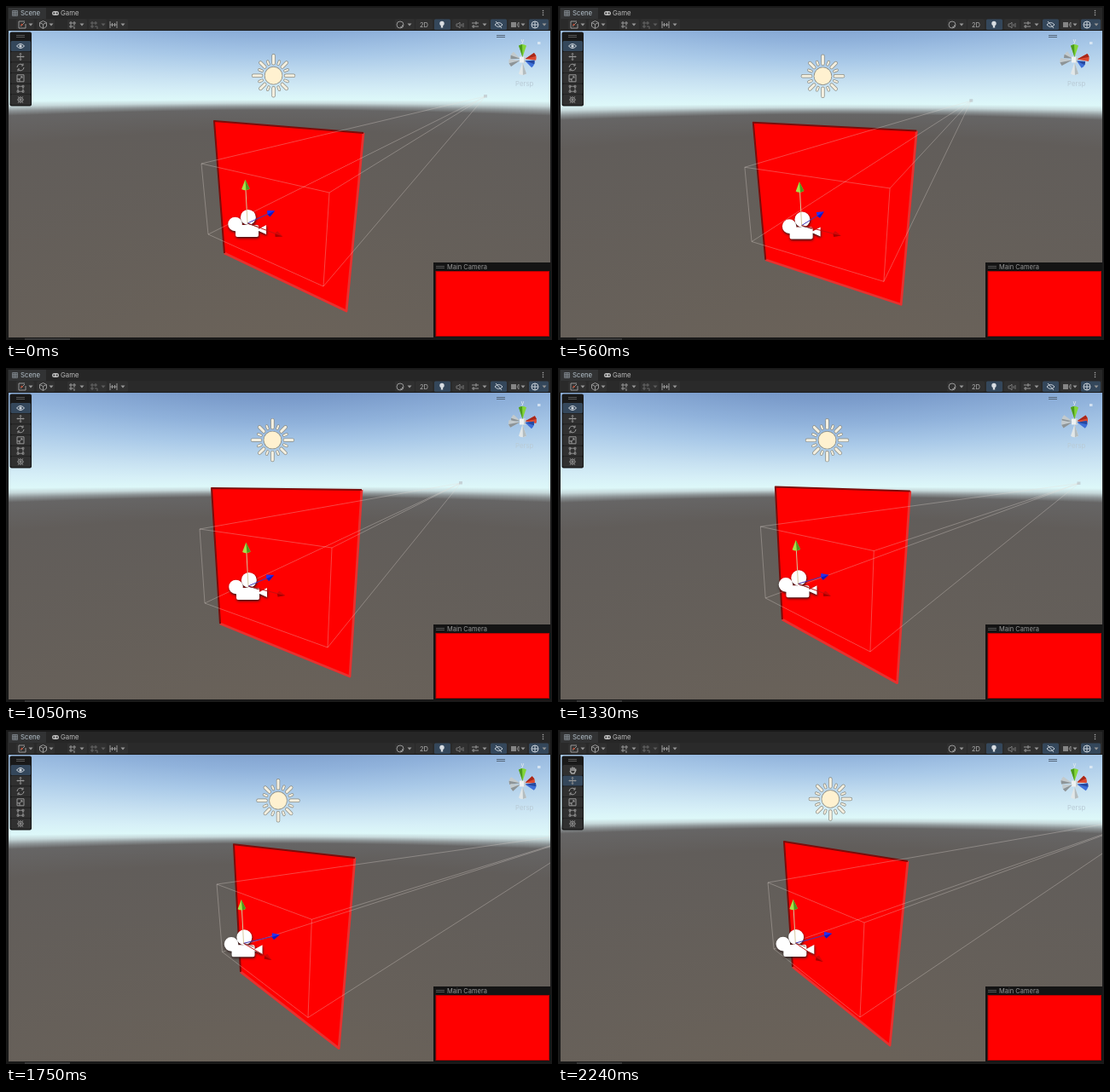
Animation, 640 px wide and 392 px high, one loop 2.66 s. Source, as an HTML page with a canvas:

```html
<!DOCTYPE html>
<html lang="en">
<head>
<meta charset="utf-8">
<title>Scene view orbit</title>
<style>
html, body { margin: 0; width: 100%; height: 100%; overflow: hidden; background: #191919; }
canvas { display: block; }
</style>
</head>
<body>
<canvas id="stage" width="640" height="392"></canvas>
<script>
const ctx = document.getElementById('stage').getContext('2d');
const LOOP = 2660, STEP = 70, STOP = 1960, TOOL_SWITCH = 2240, FOCAL = 312;

// Orbit poses: wall corners, view box corners, vanishing point
const times = [0, 350, 770, 1050, 1610, STOP];
const poses = [
  [244,135, 419,149, 399,358, 256,290,  229,185, 379,219, 372,329, 237,268,  562,106],
  [233,134, 421,149, 400,350, 248,291,  222,187, 386,218, 378,325, 231,271,  511,97],
  [228,140, 419,144, 404,353, 241,304,  218,191, 390,210, 384,323, 225,281,  473,128],
  [241,141, 417,143, 403,362, 251,300,  227,189, 382,211, 377,328, 233,276,  533,135],
  [266,137, 409,147, 392,375, 273,289,  246,183, 360,219, 356,337, 252,264,  680,130],
  [265,131, 410,154, 389,370, 275,278,  246,179, 359,226, 354,337, 253,257,  706,99]
];

function slope(i, n) {
  const last = times.length - 1;
  if (i === last) return 0;
  const a = Math.max(i - 1, 0), b = i + 1;
  return (poses[b][n] - poses[a][n]) / (times[b] - times[a]);
}

function poseAt(t) {
  t = Math.min(t, STOP);
  let i = 0;
  while (i < times.length - 2 && t >= times[i + 1]) i++;
  const span = times[i + 1] - times[i], s = (t - times[i]) / span;
  const v = poses[i].map((p, n) => {
    const q = poses[i + 1][n], blend = s * s * (3 - 2 * s);
    return p + (q - p) * blend + span * s * (1 - s) *
      ((1 - s) * slope(i, n) - s * slope(i + 1, n));
  });
  const pts = [];
  for (let n = 0; n < v.length; n += 2) pts.push([v[n], v[n + 1]]);
  return { wall: pts.slice(0, 4), box: pts.slice(4, 8), vp: pts[8] };
}

function rect(x, y, w, h, color) {
  ctx.fillStyle = color;
  ctx.fillRect(x, y, w, h);
}

function poly(pts, close = true) {
  ctx.beginPath();
  pts.forEach(p => ctx.lineTo(...p));
  if (close) ctx.closePath();
}

function line(pts, color, width = 1, close = false) {
  poly(pts, close);
  ctx.strokeStyle = color;
  ctx.lineWidth = width;
  ctx.stroke();
}

function dot(x, y, r, color) {
  ctx.beginPath();
  ctx.arc(x, y, r, 0, 7);
  ctx.fillStyle = color;
  ctx.fill();
}

function text(s, x, y, color, size = 7.8) {
  ctx.font = size + 'px Inter, sans-serif';
  ctx.fillStyle = color;
  ctx.fillText(s, x, y);
}

function icon(x, y, d, color = '#969696', width = 1) {
  ctx.save();
  ctx.translate(x, y);
  ctx.strokeStyle = color;
  ctx.lineWidth = width;
  ctx.stroke(new Path2D(d));
  ctx.restore();
}

function button(x, y, w, h, on) {
  ctx.beginPath();
  ctx.roundRect(x, y, w, h, 1.5);
  ctx.fillStyle = on ? '#34475b' : '#303030';
  ctx.fill();
}

function grip(x, y, color) {
  rect(x, y, 10, 1, color);
  rect(x, y + 2, 10, 1, color);
}

// Cone from its tip back along the angle
function cone(x, y, angle, len, w, light, dark) {
  ctx.save();
  ctx.translate(x, y);
  ctx.rotate(angle);
  ctx.beginPath();
  ctx.moveTo(0, 0);
  ctx.lineTo(-len, -w);
  ctx.quadraticCurveTo(-len - 3, 0, -len, w);
  ctx.closePath();
  ctx.fillStyle = light;
  ctx.fill();
  ctx.beginPath();
  ctx.moveTo(0, 0);
  ctx.lineTo(-len - 1.5, w * .1);
  ctx.lineTo(-len, w);
  ctx.fillStyle = dark;
  ctx.fill();
  ctx.restore();
}

function sky(horizon) {
  const g = ctx.createLinearGradient(0, -140, 0, 280);
  [[-140, '#6486b8'], [-98, '#7b9ccb'], [-70, '#90b2db'], [-46, '#a9c9e8'],
   [-22, '#c6e0f1'], [-6, '#d6eff7'], [4, '#ddf8f9'], [8, '#c6d8da'],
   [12, '#8d9496'], [16, '#666565'], [40, '#615d5a'], [280, '#6a6259']]
    .forEach(([d, c]) => g.addColorStop((d + 140) / 420, c));
  ctx.fillStyle = g;
  for (let x = 3; x < 638; x += 5) {
    ctx.save();
    ctx.translate(0, horizon);
    ctx.scale(1, Math.hypot(1, (x - 318) / FOCAL));
    ctx.fillRect(x, -200, 5, 600);
    ctx.restore();
  }
}

function sun(x, y) {
  ctx.lineCap = 'round';
  for (const [color, grow] of [['#8b8c84', 1.4], ['#f4efdf', 0]]) {
    for (let i = 0; i < 16; i++) {
      const a = i * Math.PI / 8, end = i % 2 ? 18 : i % 4 ? 21.5 : 23.5;
      const c = Math.cos(a), s = Math.sin(a);
      line([[x + c * 14.5, y + s * 14.5], [x + c * end, y + s * end]], color, (i % 2 ? 2 : 3) + grow);
    }
    dot(x, y, 10 + grow / 2, grow ? color : '#fff1d0');
  }
  ctx.lineCap = 'butt';
}

function wall(q) {
  poly(q);
  ctx.fillStyle = '#f00';
  ctx.fill();
  ctx.lineJoin = 'round';
  line([q[1], q[2], q[3]], '#e8312f', 2.8);
  line([q[3], q[0], q[1]], '#7c0c0a', 2);
}

function cameraIcon(x, y) {
  ctx.save();
  ctx.shadowColor = '#2a1a1a';
  ctx.shadowBlur = 3;
  ctx.shadowOffsetX = .5;
  ctx.shadowOffsetY = 1.5;
  ctx.beginPath();
  ctx.arc(x - 14.5, y + 1, 8.3, 0, 7);
  ctx.arc(x + .8, y - 7, 9, 0, 7);
  ctx.roundRect(x - 14, y + 2, 27, 14, 2);
  ctx.moveTo(x + 11, y + 8);
  ctx.lineTo(x + 22, y + 2);
  ctx.lineTo(x + 22, y + 13);
  ctx.closePath();
  ctx.fillStyle = '#fff';
  ctx.fill();
  ctx.restore();
}

function moveArrows(ox, oy, vx, vy) {
  const up = [ox - 2.5, oy - 51.3];
  const blue = [308 + .04 * (vx - 473), 242.5 + .08 * (vy - 112) - .012 * (vx - 560)];
  const red = [329 - .093 * (vx - 473), 269 - .1 * (vy - 106)];
  const arrow = (p, len, w, light, dark, stem) => {
    const a = Math.atan2(p[1] - oy, p[0] - ox);
    line([[ox, oy], p], stem);
    cone(p[0] + Math.cos(a) * 4, p[1] + Math.sin(a) * 4, a, len, w, light, dark);
  };
  arrow(red, 8, 3.5, '#d20808', '#a80000', '#c41010');
  arrow(blue, 8, 4, '#2630ee', '#1818b8', '#4038b8');
  arrow([up[0], up[1] + 4], 11, 4.8, '#a6e04a', '#4f9420', '#d6c8a0');
  line([[ox, oy], [ox + 12, oy + 4]], '#703030', .8);
}

function axisGizmo(vx, vy) {
  const yaw = Math.atan((vx - 320) / FOCAL), pitch = Math.atan((210 - vy) / FOCAL);
  const axis = (x, z, light, dark, label) => ({ x, y: -z * Math.sin(pitch), z, light, dark, label });
  const c = Math.cos(yaw), s = Math.sin(yaw), cx = 605.5, cy = 63;
  const parts = [
    axis(c, s, '#dd4a30', '#a8281a'), axis(s, -c, '#3d6fd8', '#2448a0'),
    axis(-c, -s, '#c3cacd', '#8d9497'), axis(-s, c, '#c3cacd', '#8d9497'),
    { x: 0, y: -Math.cos(pitch), z: -.2, light: '#83d63a', dark: '#4b9a1d', label: 'y' },
    { x: 0, y: Math.cos(pitch), z: .2, light: '#e2e7e8', dark: '#b4bdc0' },
    { z: 0, cube: true }
  ].sort((a, b) => b.z - a.z);
  for (const p of parts) {
    if (p.cube) {
      rect(cx - 3.5, cy - 3.5, 7, 7, '#eef2f2');
      rect(cx + 1.5, cy - 3.5, 2, 7, '#c9d0d2');
      continue;
    }
    const a = Math.atan2(p.y, p.x), r = Math.hypot(p.x, p.y);
    cone(cx + Math.cos(a) * 3, cy + Math.sin(a) * 3, a + Math.PI, 3 + 11 * r, 4.5, p.light, p.dark);
    if (p.label) text(p.label, cx + p.x * 21 - 2, cy + p.y * 22 + 1, '#e8eef0', 7);
  }
  rect(623, 42, 3.5, 3, 'rgba(235,242,248,.7)');
  text('Persp', 597, 94, '#b9cbd6', 7.8);
}

function scene(t) {
  const { wall: q, box, vp } = poseAt(t), [vx, vy] = vp;
  ctx.save();
  ctx.beginPath();
  ctx.rect(3, 29, 635, 360);
  ctx.clip();
  sky(vy);
  wall(q);
  sun(310 + .04 * (vx - 473), 81 + .1 * (vy - 99));
  const wire = 'rgba(230,220,215,.4)';
  line(box, wire, .8, true);
  box.forEach(p => line([p, vp], wire, .8));
  rect(vx - 2, vy - 2, 4, 3.5, 'rgba(190,198,202,.7)');
  const ox = 286 - .033 * (vx - 473), oy = 258 - .034 * (vx - 473);
  cameraIcon(ox, oy);
  moveArrows(ox, oy, vx, vy);
  axisGizmo(vx, vy);
  grip(575, 34, '#56677a');
  ctx.restore();
}

function preview() {
  rect(501, 301, 137, 88, '#141414');
  grip(504, 305, '#555');
  text('Main Camera', 517, 309.3, '#989898', 7.5);
  rect(503.5, 311, 133.5, 77, '#b80000');
  rect(504.5, 312, 131.5, 75, '#f00');
}

function header() {
  rect(0, 0, 640, 29, '#191919');
  rect(2, 2, 636, 13, '#262626');
  rect(3, 2, 44, 13, '#323334');
  icon(7.5, 5.5, 'M0 0H6V6H0ZM2 0V6M4 0V6M0 2H6M0 4H6', '#8e979e', .7);
  text('Scene', 17, 11.4, '#b4c0ca');
  ctx.beginPath();
  ctx.roundRect(54, 6, 8, 5, 2.5);
  ctx.fillStyle = '#bbb';
  ctx.fill();
  dot(56.3, 8.5, 1, '#333');
  dot(59.7, 8.5, 1, '#333');
  text('Game', 64, 11.4, '#b8b8b8');
  for (const y of [5.5, 8, 10.5]) dot(629.5, y, .8, '#aaa');
  rect(2, 15, 636, 13, '#2a2a2a');

  [[12, 21], [36, 21], [72, 23], [97, 21], [121, 22], [456, 23], [480, 20], [502, 19, 1],
   [523, 18], [543, 23], [568, 19, 1], [589, 22], [613, 23, 1]]
    .forEach(([x, w, on]) => button(x, 15.5, w, 12.5, on));
  for (const x of [29, 53, 89, 114, 137, 473, 561, 606, 631]) {
    poly([[x - 2.5, 20.5], [x + 2.5, 20.5], [x, 23.5]]);
    ctx.fillStyle = x === 114 ? '#5c5c5c' : '#969696';
    ctx.fill();
  }
  icon(15, 18, 'M0 0H7M0 0V8H8V3M2 6L7 1');
  dot(18.5, 22, 1.2, '#b85038');
  icon(39.5, 17.5, 'M4 0L8 2V6.5L4 9L0 6.5V2ZM0 2L4 4L8 2M4 4V9');
  icon(74, 18, 'M2 0V8M6 0V5M0 2H8M0 6H5M6 6V9');
  icon(99, 18, 'M2 0V8M6 0V4M0 2H8M0 6H4M5 6H8V9', '#666');
  icon(122, 18, 'M0 0V8M8 0V8M0 4H8M2.5 2V6M5.5 2V6');
  icon(458, 18, 'M8 4A4 4 0 1 1 0 4A4 4 0 1 1 8 4M4 7A3 3 0 0 0 7 4');
  text('2D', 485, 24.6, '#b4b4b4', 7.5);
  dot(511, 20.5, 2.7, '#d8dde2');
  rect(509.8, 22.5, 2.4, 3, '#d8dde2');
  icon(528, 18, 'M0 3V6H2L4 8V1L2 3ZM6 3V6M8 2V7', '#777');
  icon(546, 18, 'M0 2H8M0 6H8M5 0V4M2 4V8');
  icon(573, 18, 'M0 4Q4.5 -1 9 4Q4.5 9 0 4M1 0L8 8', '#c8d0d8');
  rect(592, 19, 6, 6, '#858585');
  icon(599, 19, 'M0 3L2 0V6Z', '#858585');
  icon(616, 17.5, 'M8 4.5A4 4 0 1 1 0 4.5A4 4 0 1 1 8 4.5M0 4.5H8M4 .5V8.5', '#c8d0d8');
}

function palette(moving) {
  ctx.beginPath();
  ctx.roundRect(4.5, 30.5, 25.5, 87, 2);
  ctx.fillStyle = '#191919';
  ctx.fill();
  grip(12, 34, '#555');
  for (let i = 0; i < 6; i++) button(5.5, 41 + i * 12.6, 23.5, 12, i === +moving);
  if (moving) {
    icon(13, 43, 'M1 5L3 8H6L8 4M2 5V1.5M4 5V.5M6 5V1M7.7 5V2.5', '#a8a8a8', 1.5);
  } else {
    icon(12.5, 43, 'M0 4Q4.5 -1 9 4Q4.5 9 0 4', '#d4dae0');
    dot(17, 47, 1.6, '#d4dae0');
  }
  icon(13, 55.5, 'M4 0V8M0 4H8M3 1L4 0L5 1M3 7L4 8L5 7M1 3L0 4L1 5M7 3L8 4L7 5');
  icon(13, 68, 'M0 4A4 4 0 0 1 7 1.5M7 -.5V2H5M8 4A4 4 0 0 1 1 6.5M1 8.5V6H3');
  icon(13, 80.8, 'M0 0H8V8H0ZM2 6L6 2M4 2H6V4M0 5H3V8');
  icon(13, 93.3, 'M1 1H7V7H1ZM0 0H2V2H0ZM6 0H8V2H6ZM0 6H2V8H0ZM6 6H8V8H6Z', '#969696', .8);
  icon(13, 106, 'M7 4A3 3 0 1 1 1 4A3 3 0 1 1 7 4M4 0V8M0 4H8M1 0L7 8M7 0L1 8', '#8c8c8c', .8);
}

function draw(now) {
  const t = Math.floor(now % LOOP / STEP) * STEP;
  rect(0, 0, 640, 392, '#191919');
  scene(t);
  header();
  palette(t >= TOOL_SWITCH);
  preview();
  rect(22, 390, 53, 2, '#383838');
  requestAnimationFrame(draw);
}
requestAnimationFrame(draw);
</script>
</body>
</html>
```
